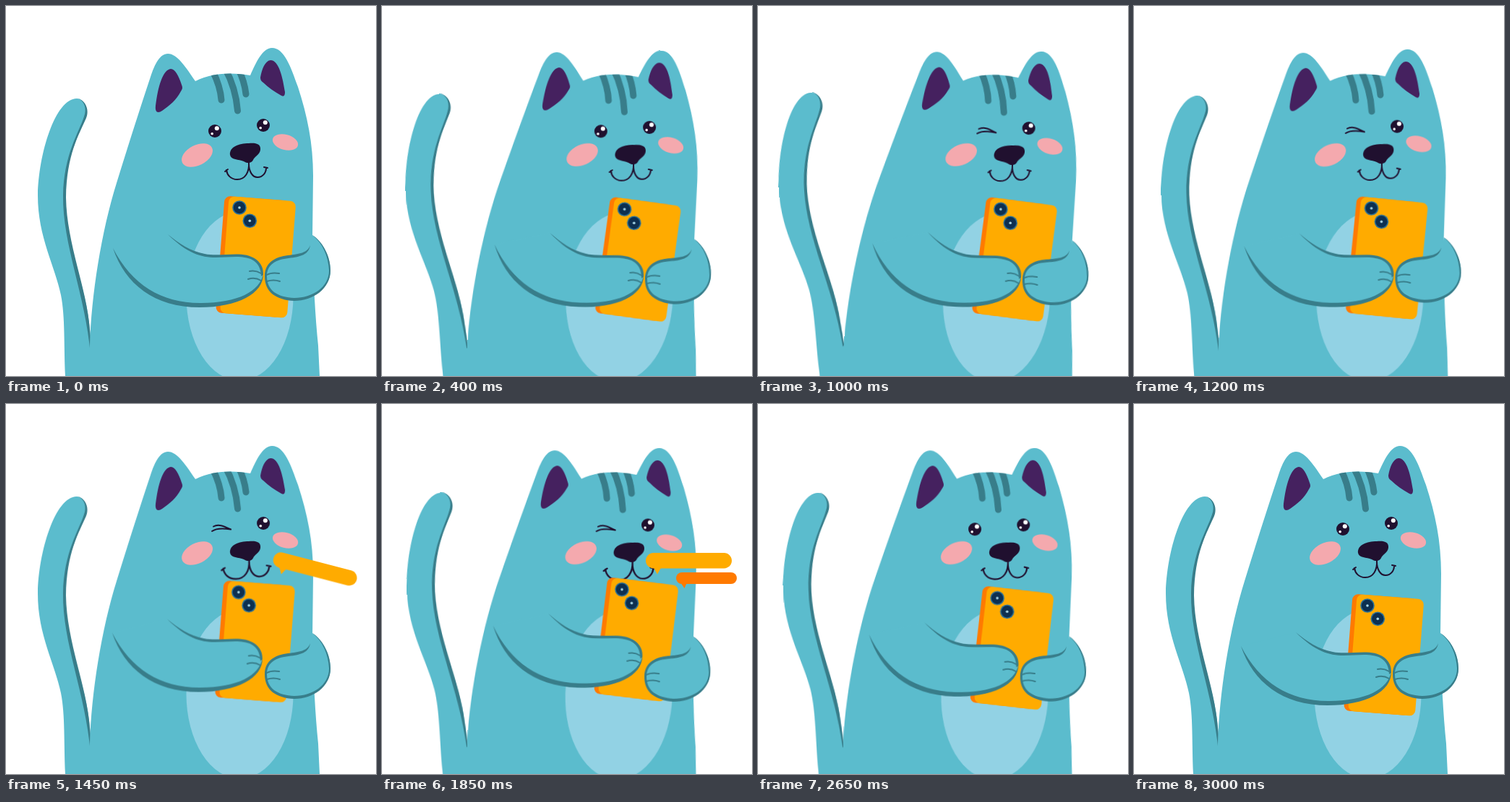
These frames come from a looping animation (512 by 512 pixels, 3050 ms). An HTML page:

```html
<!DOCTYPE html>
<html lang="en">
<head>
<meta charset="utf-8">
<title>Cat with phone</title>
<style>
html, body { margin: 0; width: 100%; height: 100%; overflow: hidden; background: #fff; }
svg { display: block; width: 100vw; height: 100vh; }

.skin { fill: #5bbccd; }
.shade { fill: #387d8a; }
.fur-line { fill: none; stroke: #387d8a; stroke-linecap: round; }
.ink { fill: #20102f; }
.ink-line { fill: none; stroke: #20102f; stroke-width: 2; stroke-linecap: round; }
.ear { fill: #45215f; }
.blush { fill: #f4a9ae; }
.amber { fill: #ffab00; }
.orange { fill: #ff7a00; }

/* Every part shares one 3050 ms loop. */
.cat, .tail, .lift, .phone, .mouth, .open, .wink, .bubble {
  animation: 3050ms linear infinite;
}
.cat { animation-name: sway; transform-origin: 285px 530px; }
.tail { animation-name: wag; transform-origin: 100px 501px; }
.cat, .tail { animation-timing-function: cubic-bezier(.37, 0, .63, 1); }
.lift { animation-name: lift; animation-timing-function: ease-in-out; }
.phone { animation-name: tilt; transform-origin: 300px 430px; animation-timing-function: ease-in-out; }
.mouth { animation-name: smile; transform-origin: 334px 218px; animation-timing-function: ease-in-out; }
.open { animation-name: open; animation-timing-function: step-end; }
.wink { animation-name: wink; animation-timing-function: step-end; }
.bubble { animation-name: pop; animation-timing-function: ease-in-out; }
.first { transform-origin: 381px 235px; }
.second { transform-origin: 418px 254px; animation-delay: -2850ms; }

@keyframes sway {
  0%, 48.5%, 98.36%, 100% { transform: rotate(0deg); }
  24.59%, 73.77% { transform: rotate(4deg); }
}
@keyframes wag {
  0%, 48.5%, 98.36%, 100% { transform: rotate(0deg); }
  24.59%, 73.77% { transform: rotate(-9.5deg); }
}
@keyframes lift {
  0%, 40.98% { transform: translate(0, 0); }
  50.82%, 81.97% { transform: translate(-1.6px, -24px); }
  91.8%, 100% { transform: translate(0, 0); }
}
@keyframes tilt {
  0%, 26.23%, 49.18% { transform: rotate(0deg); }
  13.11% { transform: rotate(1.1deg); }
  57.38%, 81.97% { transform: rotate(.6deg); }
  91.8%, 100% { transform: rotate(0deg); }
}
@keyframes smile {
  0%, 40.98% { transform: scale(1); }
  50.82%, 81.97% { transform: scale(1.2, 1.12); }
  91.8%, 100% { transform: scale(1); }
}
@keyframes open {
  0% { opacity: 1; }
  26.23% { opacity: 0; }
  68.85%, 100% { opacity: 1; }
}
@keyframes wink {
  0% { opacity: 0; }
  26.23% { opacity: 1; }
  68.85%, 100% { opacity: 0; }
}
@keyframes pop {
  0%, 40.98% { transform: rotate(40deg) scale(0); }
  47.54% { transform: rotate(14.6deg) scale(1); }
  50.82% { transform: rotate(-4deg) scale(1.04); }
  54.1%, 68.85% { transform: rotate(0deg) scale(1); }
  73.77%, 100% { transform: rotate(0deg) scale(0); }
}
</style>
</head>
<body>
<svg viewBox="0 0 512 512">
  <defs>
    <path id="body" d="M116 560 L116 470 C118 400 132 312 153 245 C171 187 186 140 200 98 C206 80 213 66 224 66
      C237 66 249 85 262 104 C287 92 313 92 338 96 C346 78 355 58 368 58 C385 58 394 84 404 112
      C417 152 425 190 425 235 L424 320 C425 380 428 430 432 470 L434 512 L436 560Z"/>
    <clipPath id="inside"><use href="#body"/></clipPath>
    <g id="eye">
      <circle class="ink" r="9"/>
      <circle cx="2.8" cy="-3.8" r="3" fill="#fff"/>
      <circle cx="-3.8" cy="3.8" r="1.8" fill="#fff"/>
    </g>
    <g id="lens">
      <circle r="9.8" fill="#2a7199"/>
      <circle r="8.2" fill="#0d2f50"/>
      <circle r="1.8" fill="#a8d8e8"/>
    </g>
  </defs>

  <g class="cat">
    <g class="tail">
      <path class="skin" d="M84 560 L82 512 C80 470 82 430 76 400 C68 360 44 320 44 262 C45 205 68 128 98 128
        C110 129 114 144 111 153 C105 172 84 200 81 262 C82 330 112 390 116 448 L119 480 L122 560Z"/>
      <path class="shade" d="M100 128 C112 132 115 146 111 155 C101 178 84 205 83 265 C84 330 112 390 116 448
        L119 480 L117 482 C110 400 78 330 79 262 C80 205 101 175 108 153 C112 143 109 132 100 128Z"/>
    </g>

    <use href="#body" class="skin"/>
    <path class="ear" d="M228 87 C217 88 210 112 207 138 C206 147 210 149 216 145 C226 138 236 130 242 118
      C245 114 244 112 243 109 C239 97 234 87 228 87Z"/>
    <path class="ear" d="M366 75 C358 76 354 88 352 99 C352 102 353 104 356 106 C363 113 372 119 381 124
      C385 126 386 123 386 119 C383 100 378 75 366 75Z"/>
    <g clip-path="url(#inside)">
      <path class="fur-line" stroke-width="9" d="M286 90 C293 104 297 116 298 130 M303 86 C314 106 319 126 320.5 145
        M321 86 C329 102 331 112 332 122"/>
    </g>

    <ellipse class="blush" rx="23" ry="14" transform="translate(264.5 206.5) rotate(-27)"/>
    <ellipse class="blush" rx="18" ry="10.5" transform="translate(386.5 188.5) rotate(15)"/>
    <g class="open"><use href="#eye" x="289" y="173"/></g>
    <path class="wink ink-line" d="M287 169.5 C294 165.5 301 169 311 173.5 M285 176 C291 171.5 299 171.5 311 173.5"/>
    <use href="#eye" x="356" y="165"/>
    <path class="mouth ink-line" d="M336 216 C337 230 331 240 320 240 C311 240 306 234 305 227
      M336 218 C336 229 341 237 348 237 C355 237 360 231 360 224 M303 229 L307 226 M357 223 L362 224"/>
    <path class="ink" d="M310 206 C309 195 322 190 336 190 C346 189 353 191 352 199 C351 206 344 208 342 213
      C340 218 333 218 329 215 C322 212 311 213 310 206Z"/>

    <ellipse cx="323.5" cy="401.5" rx="74" ry="117" fill="#92d2e4"/>

    <g class="lift">
      <g class="phone">
        <g transform="translate(348.7 347.5) rotate(4.5)">
          <rect class="orange" x="-52.5" y="-81" width="90" height="162" rx="8"/>
          <rect class="amber" x="-46.5" y="-81" width="93" height="162" rx="8"/>
        </g>
        <use href="#lens" x="323" y="279"/>
        <use href="#lens" x="337.3" y="297.3"/>
      </g>
      <path class="skin" d="M148 335 C165 382 205 415 266 415 C318 416 356 398 355 371 C355 352 338 344 312 345
        C272 349 250 337 224 316Z"/>
      <path class="shade" d="M148 335 C165 385 205 417 268 417 C320 417 357 398 356 370 C352 395 320 411 270 411
        C216 411.5 174 386 148 335Z"/>
      <path class="shade" d="M224 316 C250 342 270 348 290 348 C305 348 320 346 330 348 C347 350 353 362 353 374
        L356 372 C357 355 343 344 322 343.5 C305 343 290 346 275 343 C255 339 240 329 224 316Z"/>
      <path class="fur-line" stroke-width="2" d="M337 367 C342 366 348 367 353 370 M335 378 C341 376 348 377 353 380"/>
    </g>

    <path class="skin" d="M424 317 C440 328 449 348 449 366 C449 390 425 407 399 406 C375 406 359 395 359 374
      C359 355 372 349 390 347 C408 345 418 342 421 331Z"/>
    <path class="shade" d="M424 317 C438 326 449 346 449 366 C449 391 425 408 399 408 C374 407 358 396 358 374
      C358 354 374 347 390 345 C406 343 417 342 421 331 C419 344 408 347 391 349 C374 351 361 357 361 374
      C361 394 376 403 399 404 C424 404 447 389 447 366 C446 346 438 328 424 317Z"/>
    <path class="fur-line" stroke-width="2" d="M361 372 C366 369 372 369 378 370 M361 381 C367 379 373 379 379 381"/>
  </g>

  <g class="bubble first amber">
    <rect x="365" y="206" width="119" height="21.5" rx="10.7"/>
    <path d="M375 225 L381 235.5 L387 225Z"/>
  </g>
  <g class="bubble second orange">
    <rect x="407" y="233" width="84" height="16" rx="8"/>
    <path d="M413 247 L418.5 255 L422 247Z"/>
  </g>
</svg>
</body>
</html>
```
